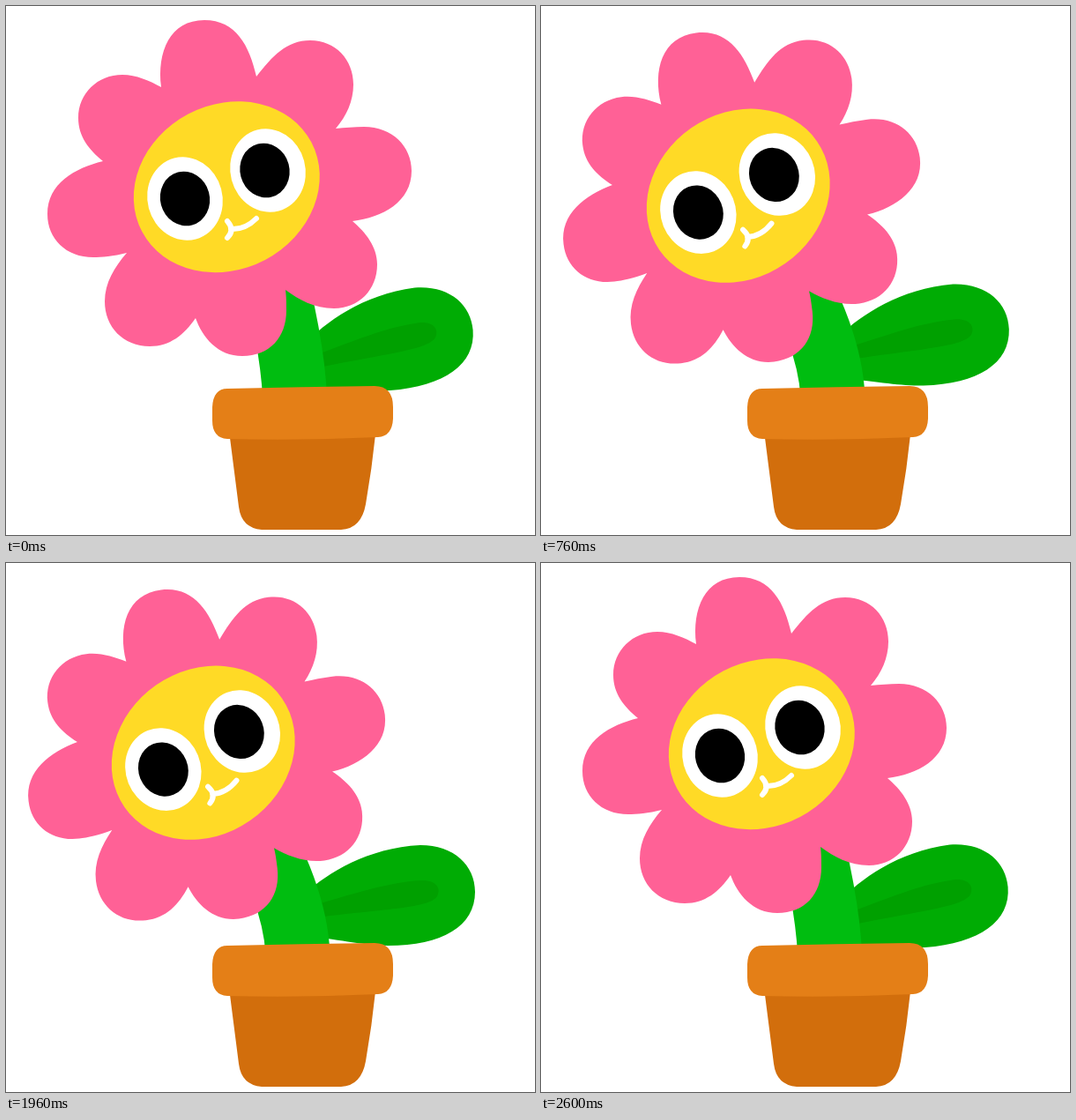
These frames come from a looping animation (600x600 px, 2.84 s). An HTML page with a canvas:

```html
<!DOCTYPE html>
<html lang="en">
<head>
<meta charset="utf-8">
<title>Flower in a pot</title>
<style>
  html, body { margin: 0; width: 100%; height: 100%; overflow: hidden; background: #fff; }
  canvas { display: block; }
</style>
</head>
<body>
<canvas id="stage" width="600" height="600"></canvas>
<script>
const ctx = document.getElementById('stage').getContext('2d');
const LOOP = 2840, STEP = 40, GROUND = 594;
const rad = deg => deg * Math.PI / 180;
const clamp = v => Math.max(0, Math.min(1, v));
const mix = (a, b, k) => a + (b - a) * k;

const petals = new Path2D(`M176 92C171 52 186 16 225 16C261 16 276 45 284 80
  C302 57 318 39 345 39C374 39 394 61 394 89C394 108 386 125 374 139
  C384 138 395 137 406 137C438 137 460 159 460 187C460 222 427 240 393 244
  C408 257 421 273 421 293C421 322 400 343 372 343C350 343 332 333 317 322
  C318 330 318 336 318 345C318 376 299 397 268 397C240 397 223 376 215 354
  C202 373 186 386 163 386C133 386 112 364 112 335C112 314 123 296 137 280
  C122 284 108 285 99 285C68 285 47 264 47 236C47 201 78 184 110 176
  C94 163 82 148 82 127C82 99 104 78 132 78C148 78 163 85 176 92Z`);
const mouth = new Path2D('M251 244Q260 254 251 263M255 253Q271 254 284 241');
const leaf = new Path2D(`M340 374C365 352 410 323 470 320C508 320 532 343 532 373
  C532 412 495 434 433 434C405 433 385 429 340 422Z`);
const vein = new Path2D(`M335 392C380 380 430 362 470 360C488 359 494 369 489 378
  C480 392 430 392 335 404Z`);
const potBody = new Path2D(`M253 482L264 568Q267 592 290 594L380 594
  Q403 593 408 565Q415 525 419 486Z`);
const potRim = new Path2D(`M251 434Q335 432 418 431Q439 431 439 455L439 468
  Q438 488 422 489Q337 493 251 491Q234 490 234 470L234 455Q235 434 251 434Z`);

// time, lean, head drop, vertical scale, lift
const keys = [
  [80, 0, 0, 1, 0],
  [200, 0, 1.1, 0.965, 0],
  [280, 0, 0.89, 0.977, 3],
  [420, 0.15, 0, 1.026, 0],
  [560, 1, 0.3, 0.988, 0],
  [680, 1, 0, 1, 0],
  [2200, 1, 0, 1, 0],
  [2360, 0, 1.05, 0.968, 0],
  [2400, 0, 1, 0.97, 0],
  [2600, 0, 0, 1, 0]
];

function poseAt(t) {
  if (t <= keys[0][0]) return keys[0].slice(1);
  const i = keys.findIndex(k => k[0] >= t);
  if (i < 0) return keys[keys.length - 1].slice(1);
  const a = keys[i - 1], b = keys[i];
  const k = (t - a[0]) / (b[0] - a[0]), e = k * k * (3 - 2 * k);
  return a.slice(1).map((v, n) => mix(v, b[n + 1], e));
}

const waveAt = t => t < 716 || t > 2296 ? 0
  : 6.3 * (1 - Math.cos((t - 716) / 316 * 2 * Math.PI));

const blinkAt = t => Math.max(...[280, 1520].map(c => clamp((140 - Math.abs(t - c)) / 80)));

function fill(path, color) {
  ctx.fillStyle = color;
  ctx.fill(path);
}

function oval(x, y, rx, ry, deg) {
  const path = new Path2D();
  path.ellipse(x, y, rx, ry, rad(deg), 0, 2 * Math.PI);
  return path;
}

function drawEye(x, y, pupilX, blink) {
  const white = oval(x, y, 42.5, 47.5, -15);
  if (blink < 1) {
    fill(white, '#fff');
    fill(oval(pupilX, y, 28, 31, -15), '#000');
  }
  if (blink > 0) {
    ctx.save();
    ctx.clip(white);
    fill(oval(x, y - 96 * (1 - blink), 44, 49, -15), '#ffb733');
    ctx.restore();
  }
}

function drawLeaf(lean, drop, wave) {
  ctx.save();
  ctx.translate(mix(321, 320, lean) + drop, mix(419, 408, lean) + 5 * drop);
  ctx.rotate(rad(mix(-4.5, 0.5, lean) - 2 * drop - wave));
  ctx.translate(-320, -408);
  fill(leaf, '#00ac04');
  fill(vein, '#00a000');
  ctx.restore();
}

function drawStem(lean, drop) {
  ctx.beginPath();
  ctx.moveTo(mix(328, 331, lean) + 1.5 * drop, 460);
  ctx.quadraticCurveTo(mix(328, 334, lean) + 2 * drop, mix(398, 392, lean) + 5 * drop,
    mix(303, 284, lean) + 3 * drop, mix(300, 302, lean) + 11 * drop);
  ctx.lineWidth = 73;
  ctx.lineCap = 'butt';
  ctx.strokeStyle = '#00bd10';
  ctx.stroke();
}

function drawHead(lean, drop, blink) {
  ctx.save();
  ctx.translate(250.8 - 25.9 * lean + 3 * drop, 210.9 + 9.9 * lean + 11 * drop);
  ctx.rotate(rad(-6.9 * lean));
  ctx.translate(-250.8, -210.9);
  fill(petals, '#ff6196');
  fill(oval(250.3, 205.2, 108.6, 93.5, -27.8), '#ffda26');
  drawEye(203, 218.5, 203, blink);
  drawEye(297, 186.5, 293.5, blink);
  ctx.lineWidth = 6;
  ctx.lineCap = ctx.lineJoin = 'round';
  ctx.strokeStyle = '#fff';
  ctx.stroke(mouth);
  ctx.restore();
}

function draw(t) {
  const [lean, drop, scale, lift] = poseAt(t);
  ctx.clearRect(0, 0, 600, 600);
  ctx.save();
  ctx.translate(0, GROUND - lift);
  ctx.scale(1, scale);
  ctx.translate(0, -GROUND);
  drawLeaf(lean, drop, waveAt(t));
  drawStem(lean, drop);
  fill(potBody, '#d26e0c');
  fill(potRim, '#e47f17');
  drawHead(lean, drop, blinkAt(t));
  ctx.restore();
}

const start = performance.now();
function tick() {
  const t = (performance.now() - start) % LOOP;
  draw(Math.floor(t / STEP) * STEP);
  requestAnimationFrame(tick);
}
tick();
</script>
</body>
</html>
```
